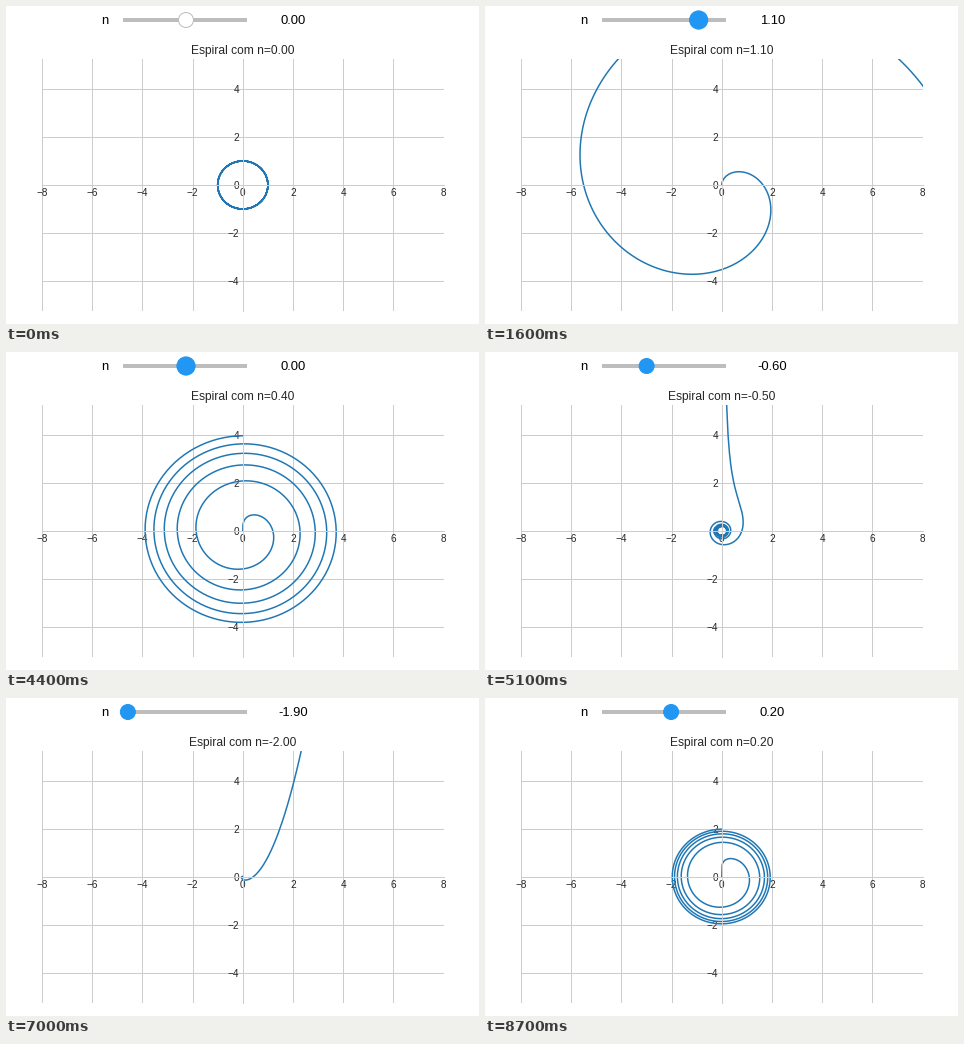
Write a matplotlib script that moves like this. It is 473x318 px and loops after 9300 ms.

```python
import numpy as np
import matplotlib.pyplot as plt
from matplotlib.animation import FuncAnimation
from matplotlib.patches import Circle, Rectangle

WIDTH, HEIGHT, DPI = 473, 318, 72
FRAMES, INTERVAL = 93, 100
GRAY, BLUE, INK = "#bdbdbd", "#2196f3", "0.15"
HOVER, PRESS, RELEASE = 3, 7, 48

plt.rcParams["font.family"] = "Liberation Sans"

# Turning points of the drag: (frame, slider value)
DRAG = [(6, 0), (15, 1.1), (17, 1.1), (24, 1.7), (28, 1.7), (29, 1.8),
        (30, 2), (34, 2), (36, 1.5), (38, 1.5), (43, 0.4), (44, 0),
        (49, -0.5), (50, -0.5), (62, -2), (69, -2), (70, -1.9),
        (79, -0.1), (84, 0.2)]
DRAG_FRAMES, DRAG_VALUES = zip(*DRAG)

THETA = np.linspace(0, 10 * np.pi, 1000)


def slider_at(frame):
    """Slider value in steps of 0.1, without a negative zero."""
    return round(float(np.interp(frame, DRAG_FRAMES, DRAG_VALUES)), 1) + 0.0


def spiral(n):
    with np.errstate(divide="ignore", invalid="ignore"):
        r = THETA ** n
        return r * np.sin(THETA), r * np.cos(THETA)


fig = plt.figure(figsize=(WIDTH / DPI, HEIGHT / DPI), dpi=DPI, facecolor="white")

# Slider, laid out in pixels from the top left
panel = fig.add_axes([0, 0, 1, 1])
panel.set(xlim=(0, WIDTH), ylim=(HEIGHT, 0))
panel.axis("off")
panel.add_patch(Rectangle((117, 12), 124, 4, fc=GRAY, lw=0))
handle = panel.add_patch(Circle((180, 14), 7.5, lw=1, zorder=3))
panel.text(95.4, 18, "n", size=13, color="black")
readout = panel.text(287.2, 18, "", size=13, color="black", ha="center")

# Plot with its axes through the origin
ax = fig.add_axes([35.9 / WIDTH, 13 / HEIGHT, 401.76 / WIDTH, 252 / HEIGHT])
ax.set(xlim=(-8, 8), ylim=(-5.25, 5.25),
       xticks=range(-8, 9, 2), yticks=range(-4, 5, 2))
ax.set_axisbelow(True)
ax.grid(color="0.8", lw=1)
for side in ("left", "bottom"):
    ax.spines[side].set(position="zero", color="0.8", linewidth=1)
for side in ("right", "top"):
    ax.spines[side].set_visible(False)
ax.tick_params(length=0, pad=3.5, labelsize=10, labelcolor=INK)
title = ax.set_title("", size=12, color=INK, pad=5, y=1.0)
curve, = ax.plot([], [], color="#1f77b4", lw=1.5)


def update(frame):
    slider = slider_at(frame)
    plotted = slider_at(frame - 1)  # the plot trails the slider by one redraw
    handle.center = (180 + 30.6 * slider, 14)
    handle.set_radius(9.1 if PRESS <= frame < RELEASE else 7.5)
    handle.set_facecolor(BLUE if frame >= HOVER else "white")
    handle.set_edgecolor(BLUE if frame >= HOVER else GRAY)
    readout.set_text(f"{slider:.2f}")
    title.set_text(f"Espiral com n={plotted:.2f}")
    curve.set_data(*spiral(plotted))
    return handle, readout, title, curve


anim = FuncAnimation(fig, update, frames=FRAMES, interval=INTERVAL,
                     repeat=True, repeat_delay=0)
plt.show()
```
